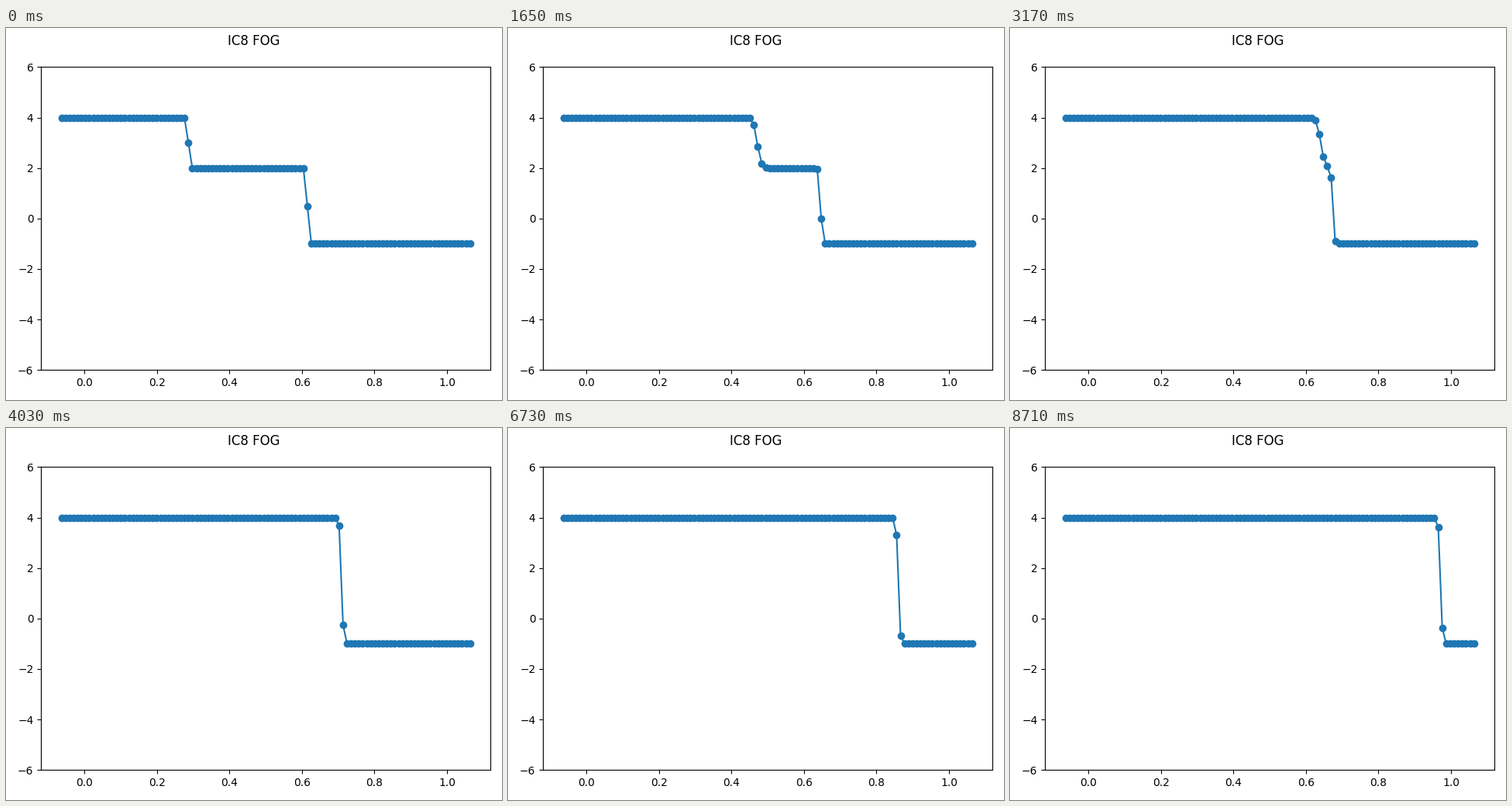
A matplotlib script that plays this animation: 640 px wide and 480 px high, repeating every 8.78 s.

```python
import numpy as np
import matplotlib.pyplot as plt
from matplotlib.animation import FuncAnimation

CELLS, GHOSTS = 100, 2
CFL = 0.9
LOOP_MS, INTERVAL = 8780, 20
STEP_MS = 66


def initial(x):
    return np.where(x < 0.3, 4.0, np.where(x < 0.6, 2.0, -1.0))


def godunov_flux(ul, ur):
    """Exact Riemann flux for Burgers' equation."""
    return np.maximum(np.maximum(ul, 0) ** 2, np.minimum(ur, 0) ** 2) / 2


def step(u):
    flux = godunov_flux(u[:-1], u[1:])
    new = u.copy()
    new[1:-1] -= CFL / np.abs(u).max() * np.diff(flux)
    new[:GHOSTS] = new[GHOSTS]
    new[-GHOSTS:] = new[-GHOSTS - 1]
    return new


def solve(count):
    # Cell averages by the trapezoidal rule; edges nudged off the jumps.
    edges = np.arange(-GHOSTS, CELLS + GHOSTS + 1) / CELLS - 1e-9
    values = initial(edges)
    states = [(values[:-1] + values[1:]) / 2]
    while len(states) < count:
        states.append(step(states[-1]))
    return states


states = solve(LOOP_MS // STEP_MS)
x = np.linspace(-0.0635, 1.0635, CELLS + 2 * GHOSTS)

fig, ax = plt.subplots(figsize=(6.4, 4.8), dpi=100)
fig.suptitle("IC8 FOG", y=0.984)
line, = ax.plot(x, states[0], "o-")
ax.set_ylim(-6, 6)
fig.tight_layout()
fig.subplots_adjust(top=0.895)


def update(k):
    # Step times fall on a 10 ms grid, so look just past the middle of the tick.
    n = (k * INTERVAL + 15) // STEP_MS
    line.set_ydata(states[n])
    return line,


anim = FuncAnimation(fig, update, frames=LOOP_MS // INTERVAL,
                     interval=INTERVAL, repeat=True, repeat_delay=0)
plt.show()
```
